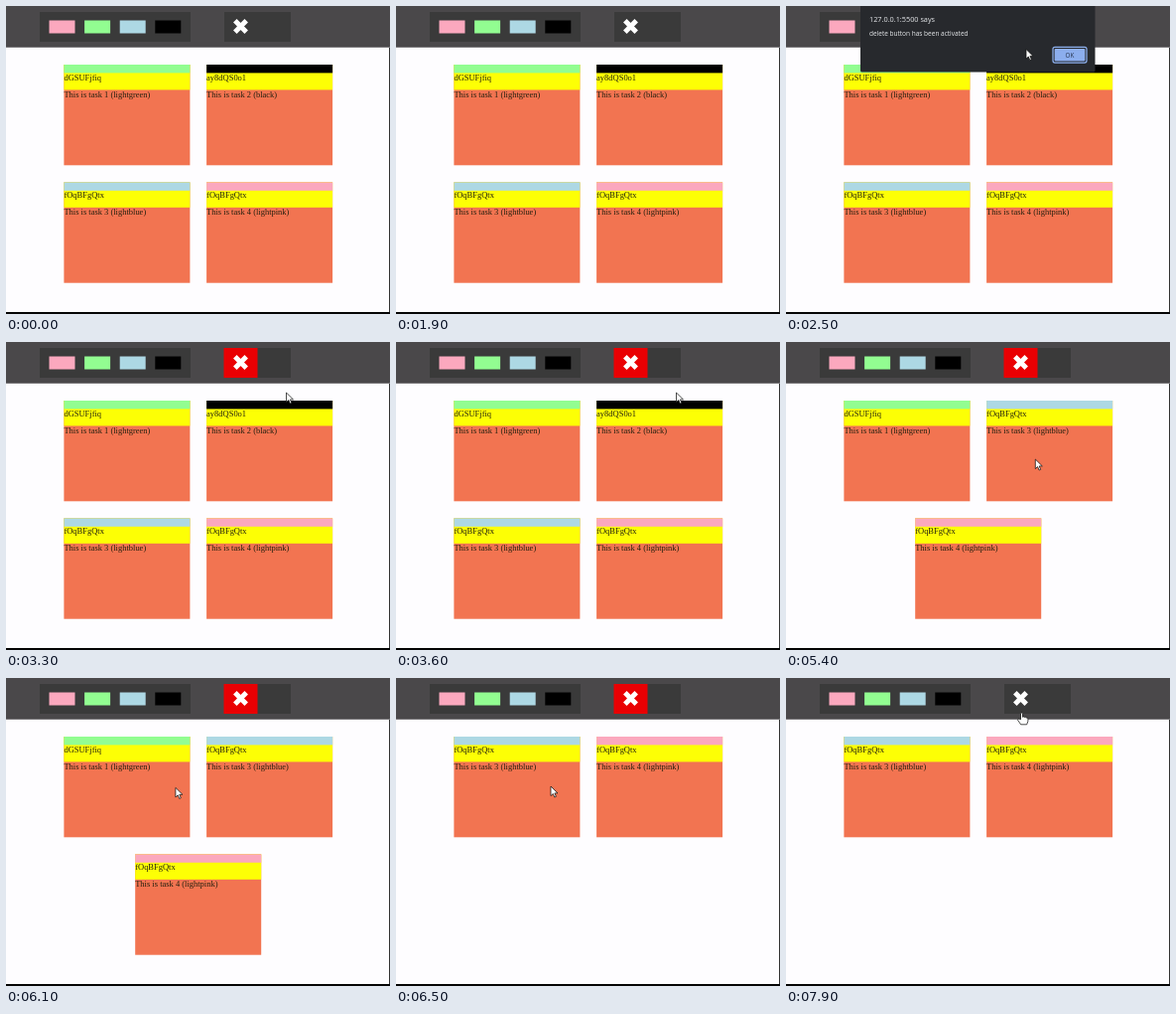
Write an HTML page that moves like this. It is 387 by 310 pixels and loops after 8000 ms.

```html
<!DOCTYPE html>
<html lang="en">
<head>
<meta charset="utf-8">
<title>Task board</title>
<style>
  html, body { margin: 0; width: 100%; height: 100%; overflow: hidden; background: #fefdff; }
  svg { display: block; width: 387px; height: 310px; }
  .task text { font: 8.47px "Liberation Serif", Times, serif; fill: #24200f; }
  #dialog text { font-family: "Open Sans", "Noto Sans", sans-serif; fill: #e8eaed; }
</style>
</head>
<body>
<svg id="stage" viewBox="0 0 387 310" xmlns="http://www.w3.org/2000/svg">
  <rect width="387" height="310" fill="#fefdff"/>
  <rect width="387" height="41.7" fill="#4a484a"/>
  <rect x="34" y="6" width="152" height="30" fill="#3a3a3a"/>
  <g id="swatches"></g>
  <rect x="220" y="6" width="67" height="30" fill="#3a3a3a"/>
  <rect id="active" x="219.5" y="6" width="34" height="30" fill="#e90003"/>
  <path d="M230.8 14.8L242.2 26.2M242.2 14.8L230.8 26.2" stroke="#fff" stroke-width="5"/>
  <g id="tasks"></g>
  <path d="M386.5 42V310" stroke="#333"/>
  <rect y="308" width="387" height="2" fill="#050505"/>
  <g id="dialog">
    <rect x="75" y="-4" width="236.5" height="70.5" rx="1.5" fill="#27292d"/>
    <text x="84" y="15.5" font-size="7.3">127.0.0.1:5500 says</text>
    <text x="84" y="30" font-size="6.5">delete button has been activated</text>
    <rect x="269" y="41.3" width="34" height="15.8" rx="2" fill="#27292d" stroke="#8fb3f3" stroke-width="1.2"/>
    <rect x="270.6" y="42.9" width="30.8" height="12.6" rx="1.2" fill="#8caeee"/>
    <text x="286" y="51.7" font-size="6.3" text-anchor="middle" style="fill:#27344f">OK</text>
  </g>
  <g id="cursor" fill="#fff" stroke="#111" stroke-width=".75" stroke-linejoin="round">
    <path id="arrow" d="M0 0V9.6L2.3 7.5L3.8 11L5.4 10.3L3.9 6.9H7Z"/>
    <path id="hand" d="M-1 6.8V.8Q0-.6 1 .8V4.3Q2.2 3.4 3 4.6Q4.2 3.9 4.9 5.1Q6.3 4.8 6.4 6.2V8.4L5.2 11.8H-.8L-3.9 7.4Q-4 5.8-2.5 6.1Z"/>
  </g>
</svg>
<script>
const LOOP = 8000, STEP = 100;
const DIALOG = [2300, 3200], ACTIVE = [2300, 7500];
const colors = { lightpink: "#fba8be", lightgreen: "#92fd91", lightblue: "#add8e4", black: "#000" };
const tasks = [
  { id: "dGSUFjfiq", color: "lightgreen", gone: 6500 },
  { id: "ay8dQS0o1", color: "black", gone: 4900 },
  { id: "fOqBFgQtx", color: "lightblue", gone: Infinity },
  { id: "fOqBFgQtx", color: "lightpink", gone: Infinity }
];
// Pointer stops: time, x, y
const path = [
  [2000, 258, 2], [2200, 236, 26], [2300, 236, 27], [2500, 242, 43.5], [2900, 282.5, 51],
  [3600, 282.5, 51], [4500, 251.3, 118], [5500, 251.3, 118], [6300, 156, 109],
  [6600, 156, 109], [7200, 237, 30], [7500, 237, 30], [7800, 237.5, 35]
];
const $ = id => document.getElementById(id);
const show = (el, on) => el.setAttribute("display", on ? "inline" : "none");
const move = (el, x, y) => el.setAttribute("transform", `translate(${x} ${y})`);
const during = (t, [from, to]) => t >= from && t < to;

$("swatches").innerHTML = Object.values(colors).map((fill, i) =>
  `<rect x="${43.5 + i * 35.6}" y="14.5" width="26" height="13" fill="${fill}"/>`).join("");

$("tasks").innerHTML = tasks.map(({ id, color }, i) => `<g class="task">
  <rect width="127" height="101.3" fill="#f27451"/>
  <rect width="127" height="25.4" fill="#fdff05"/>
  <rect width="127" height="8.4" fill="${colors[color]}"/>
  <text y="16">${id}</text>
  <text y="33">This is task ${i + 1} (${color})</text></g>`).join("");
const cards = [...$("tasks").children];

function pointerAt(t) {
  const next = path.findIndex(stop => stop[0] > t);
  if (next < 0) return path[path.length - 1].slice(1);
  const [t0, x0, y0] = path[next - 1], [t1, x1, y1] = path[next];
  const k = (t - t0) / (t1 - t0), e = k * k * (3 - 2 * k);
  return [x0 + (x1 - x0) * e, y0 + (y1 - y0) * e];
}

function layout(t) {
  const left = cards.filter((card, i) => t < tasks[i].gone);
  cards.forEach(card => show(card, left.includes(card)));
  left.forEach((card, i) => {
    const alone = i % 2 === 0 && i === left.length - 1;
    move(card, alone ? 130.2 : 58.4 + (i % 2) * 143.7, 59 + (i >> 1) * 118.4);
  });
}

function render(t) {
  const dialogOpen = during(t, DIALOG), visible = t >= path[0][0];
  layout(t);
  show($("active"), during(t, ACTIVE));
  show($("dialog"), dialogOpen);
  show($("cursor"), visible);
  if (!visible) return;
  const [x, y] = pointerAt(t);
  const hover = !dialogOpen && x > 219 && x < 254 && y > 6 && y < 36;
  show($("hand"), hover);
  show($("arrow"), !hover);
  move($("cursor"), x, y);
}

const start = performance.now();
function tick() {
  const t = (performance.now() - start) % LOOP;
  render(Math.floor(t / STEP) * STEP);
  requestAnimationFrame(tick);
}
tick();
</script>
</body>
</html>
```
